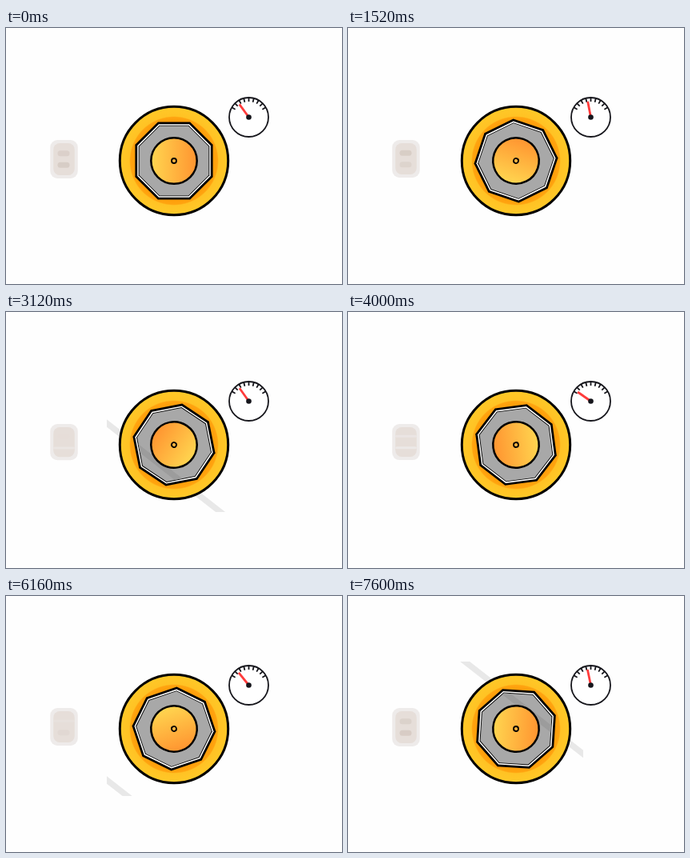
An HTML page with a canvas that plays this animation: 420 px wide and 320 px high, repeating every 7680 ms.

```html
<!DOCTYPE html>
<html>
<head>
<meta charset="utf-8">
<style>
html, body { margin: 0; width: 420px; height: 320px; overflow: hidden; background: #fefefe; }
canvas { display: block; }
</style>
</head>
<body>
<canvas id="stage" width="420" height="320"></canvas>
<script>
const ctx = document.getElementById('stage').getContext('2d');
const LOOP = 7680, STEP = 80, TAU = Math.PI * 2, RAD = Math.PI / 180;

function fill(color) {
  ctx.fillStyle = color;
  ctx.fill();
}

function circle(x, y, r, color, line, width) {
  ctx.beginPath();
  ctx.arc(x, y, r, 0, TAU);
  fill(color);
  if (!line) return;
  ctx.strokeStyle = line;
  ctx.lineWidth = width;
  ctx.stroke();
}

// Regular octagon given by the distance from centre to side
function octagon(apothem) {
  const r = apothem / Math.cos(TAU / 16);
  ctx.beginPath();
  for (let i = 0; i < 8; i++) {
    const a = (i + 0.5) * TAU / 8;
    ctx.lineTo(r * Math.cos(a), r * Math.sin(a));
  }
  ctx.closePath();
}

function pill(x, y, w, h, r, color) {
  ctx.beginPath();
  ctx.roundRect(x - w / 2, y - h / 2, w, h, r);
  fill(color);
}

function ray(angle, from, to, color, width) {
  const x = Math.sin(angle), y = -Math.cos(angle);
  ctx.beginPath();
  ctx.moveTo(x * from, y * from);
  ctx.lineTo(x * to, y * to);
  ctx.strokeStyle = color;
  ctx.lineWidth = width;
  ctx.stroke();
}

// Diagonal band that sweeps up and right through a square window
function band(t, color) {
  const shift = -310 + 0.0896 * (t % (LOOP / 2));
  ctx.save();
  ctx.beginPath();
  ctx.rect(-84, -84, 168, 168);
  ctx.clip();
  ctx.rotate(38 * RAD);
  ctx.fillStyle = color;
  ctx.fillRect(-150, -shift - 3.7, 300, 7.4);
  ctx.restore();
}

// Faint body whose two seams darken when squeezed and lighten when stretched
function drawCoils(t) {
  const phase = t / LOOP * TAU;
  const height = 46.5 + 1.5 * Math.cos(phase);
  const middle = 140 + height / 2;
  pill(72.5, middle, 34.5, height, 9, '#eeebea');
  pill(72.5, middle, 26.5, height - 8, 8, '#e6ded9');
  for (const [side, lag] of [[-1, 0.8], [1, 0.15]]) {
    const squeeze = 0.2 + Math.cos(phase - lag);
    const y = middle + side * 7.3;
    if (squeeze > 0) pill(72, y, 15, 7, 3.5, `rgba(196,180,170,${0.35 * squeeze})`);
    else pill(72.5, y, 26.5, 3, 1.5, `rgba(238,235,234,${-squeeze})`);
  }
}

function drawWheel(t) {
  ctx.save();
  ctx.translate(210, 166);
  band(t, '#e8e8e8');

  const rim = ctx.createRadialGradient(0, 0, 0, 0, 0, 68);
  rim.addColorStop(0.7, '#ff9c08');
  rim.addColorStop(0.8, '#ffa410');
  rim.addColorStop(0.82, '#ffc224');
  rim.addColorStop(1, '#ffc928');
  circle(0, 0, 67.7, rim, '#000', 3);

  const turn = -t / LOOP * TAU;
  ctx.rotate(turn);
  const layers = [[48.6, '#000'], [45.8, '#fff'], [44.3, '#000'], [43.4, '#a8a8a8']];
  for (const [size, color] of layers) {
    octagon(size);
    fill(color);
  }
  ctx.save();
  ctx.clip();
  ctx.rotate(-turn);
  band(t, '#9c9c9c');
  ctx.restore();

  const shade = ctx.createLinearGradient(-29, 0, 29, 0);
  shade.addColorStop(0, '#ffd650');
  shade.addColorStop(1, '#ff9430');
  circle(0, 0, 28.7, shade, '#000', 2.5);
  circle(0, 0, 3, '#ffb340', '#000', 1.8);
  ctx.restore();
}

function drawGauge(t) {
  ctx.save();
  ctx.translate(303.5, 111.5);
  circle(0, 0, 24.5, '#fff', '#16161c', 1.8);
  for (let a = -60; a <= 60; a += 15) ray(a * RAD, 19.5, 24, '#16161c', 1.8);
  ray((-36 + 25 * Math.sin(t / 1000)) * RAD, 0, 20, '#ff3b3b', 2.8);
  circle(0, 0, 3.3, '#16161c');
  ctx.restore();
}

function draw(now) {
  const t = Math.floor(now % LOOP / STEP) * STEP;
  ctx.fillStyle = '#fefefe';
  ctx.fillRect(0, 0, 420, 320);
  drawCoils(t);
  drawWheel(t);
  drawGauge(t);
}

let start;
function tick(now) {
  start ??= now;
  draw(now - start);
  requestAnimationFrame(tick);
}
draw(0);
requestAnimationFrame(tick);
</script>
</body>
</html>
```
